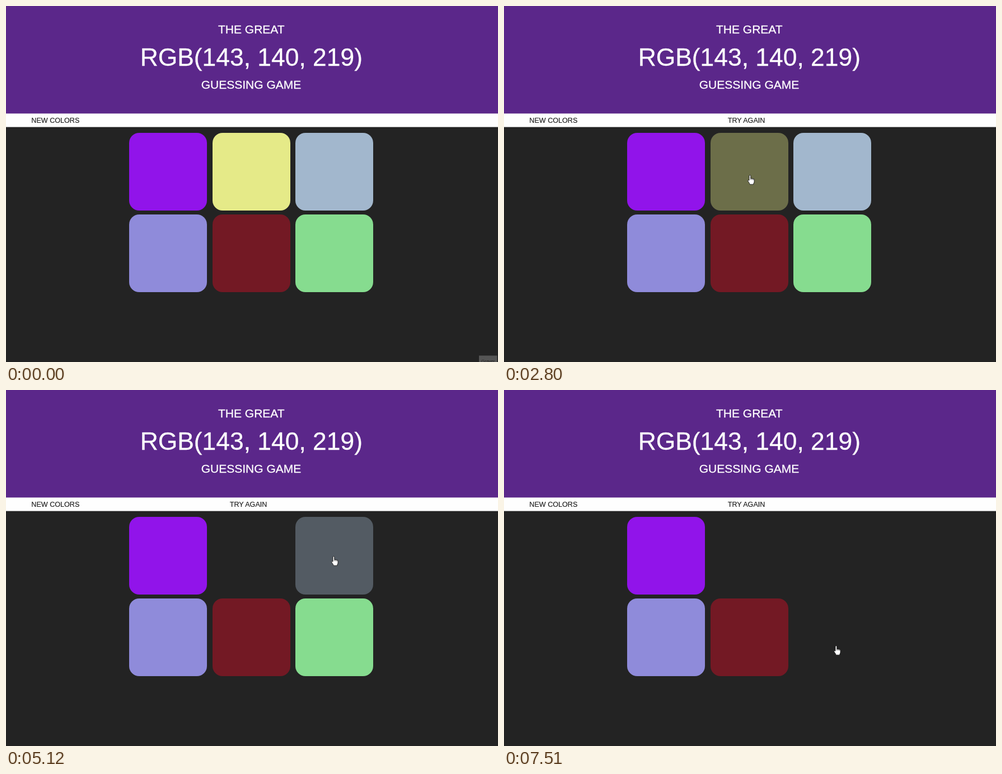
An HTML page that plays this animation: 879x637 px, repeating every 8000 ms.

```html
<!DOCTYPE html>
<html lang="en">
<head>
<meta charset="utf-8">
<title>Color guessing game</title>
<style>
  html, body { margin: 0; width: 100%; height: 100%; overflow: hidden; background: #232323; }
  svg { display: block; width: 100%; height: 100%; }
  text { font-family: "Liberation Sans", Arial, sans-serif; }
  .title { fill: #fff; stroke: #fff; stroke-width: .3; text-anchor: middle; font-size: 21px; }
  .title.big { font-size: 44.4px; }
  .bar { fill: #1c1c1c; stroke: #1c1c1c; stroke-width: .15; font-size: 12.6px; }
</style>
</head>
<body>
<svg viewBox="0 0 879 637">
  <rect width="879" height="637" fill="#232323"/>
  <rect width="879" height="193" fill="#5b278a"/>
  <rect y="192.4" width="879" height="24.2" fill="#fefefe"/>
  <text class="title" x="438.3" y="49">THE GREAT</text>
  <text class="title big" x="438.3" y="107">RGB(143, 140, 219)</text>
  <text class="title" x="438" y="148">GUESSING GAME</text>
  <text class="bar" x="45.3" y="208.5">NEW COLORS</text>
  <text class="bar" x="399.7" y="208.5" id="message">TRY AGAIN</text>
  <g id="tiles"></g>
  <g id="tooltip">
    <rect x="845" y="625.5" width="32.5" height="12" fill="#555"/>
    <text x="849" y="638" font-size="8" fill="#222">Graver</text>
  </g>
  <g id="cursor" fill="#fff" stroke="#111" stroke-width=".9" stroke-linejoin="round">
    <path id="arrow" d="M0 0V13.5L3.1 10.6 5.2 15.4 7.3 14.5 5.2 9.8H9.4Z"/>
    <g id="hand" transform="translate(-.5 -.4)">
      <path d="M-1.5 9.5V1.5a1.4 1.4 0 0 1 2.8 0V6q1.2-.9 2.3.3q1.3-.7 2.2.5q1.8-.5 1.8 1.5V11.5q0 2.2-1.3 3.7V16.6H-.4Q-.6 14.8-2.2 12.8L-4 10.2q.2-1.6 1.4-1.2z"/>
      <path d="M1.3 6v2.6M3.6 6.3v2.4M5.8 6.8v2.2" fill="none" stroke-width=".7"/>
    </g>
  </g>
</svg>
<script>
const LOOP = 8000, STEP = 70, FADE = 500, SIZE = 139;
const $ = id => document.getElementById(id);
const show = (el, on) => el.setAttribute("visibility", on ? "inherit" : "hidden");
const stepsSince = (t, start) => Math.floor((t - start) / STEP);
const easeOut = p => 1 - (1 - Math.min(1, p)) ** 2.2;

// colour and, for wrong guesses, the time the fade begins to show
const tiles = [
  ["#9114ea"], ["#e5ea88", 2660], ["#a2b7cd", 4980],
  ["#8f8bda"], ["#731924"], ["#86dc8f", 6670]
].map(([fill, start], i) => {
  const x = Math.round(220 + 148.5 * (i % 3)), y = i < 3 ? 227 : 373;
  const el = document.createElementNS("http://www.w3.org/2000/svg", "rect");
  const attrs = { x, y, width: SIZE, height: SIZE, rx: 18, fill };
  for (const key in attrs) el.setAttribute(key, attrs[key]);
  $("tiles").append(el);
  return { x, y, start, el };
});

// pointer moves: start time, number of steps, goal x, goal y
const home = [891, 689];
const moves = [
  [330, 9, 299, 265], [1090, 2, 309, 262], [1490, 3, 389, 298], [1700, 4, 412, 299],
  [2110, 7, 440, 303], [3220, 2, 437, 303], [3680, 1, 449, 307], [3750, 9, 583, 300],
  [4560, 3, 586, 298], [5670, 4, 604, 447], [6950, 4, 602, 452], [7300, 4, 594, 458]
];

function pointerAt(t) {
  let [x, y] = home;
  for (const [start, steps, goalX, goalY] of moves) {
    if (t < start) break;
    const p = easeOut((stepsSince(t, start) + 1) / steps);
    x += (goalX - x) * p;
    y += (goalY - y) * p;
  }
  return [x, y];
}

function render(t) {
  for (const { start, el } of tiles) {
    const fading = t >= start;
    el.setAttribute("opacity", fading ? 1 - easeOut((stepsSince(t, start) * STEP + 40) / FADE) : 1);
  }
  show($("message"), t >= tiles[1].start);
  show($("tooltip"), t < STEP);

  const [x, y] = pointerAt(t);
  const over = tiles.some(q => x >= q.x && x < q.x + SIZE && y >= q.y && y < q.y + SIZE);
  $("cursor").setAttribute("transform", `translate(${x} ${y})`);
  show($("hand"), over);
  show($("arrow"), !over);
}

const begin = performance.now();
function tick() {
  render((performance.now() - begin) % LOOP);
  requestAnimationFrame(tick);
}
tick();
</script>
</body>
</html>
```
